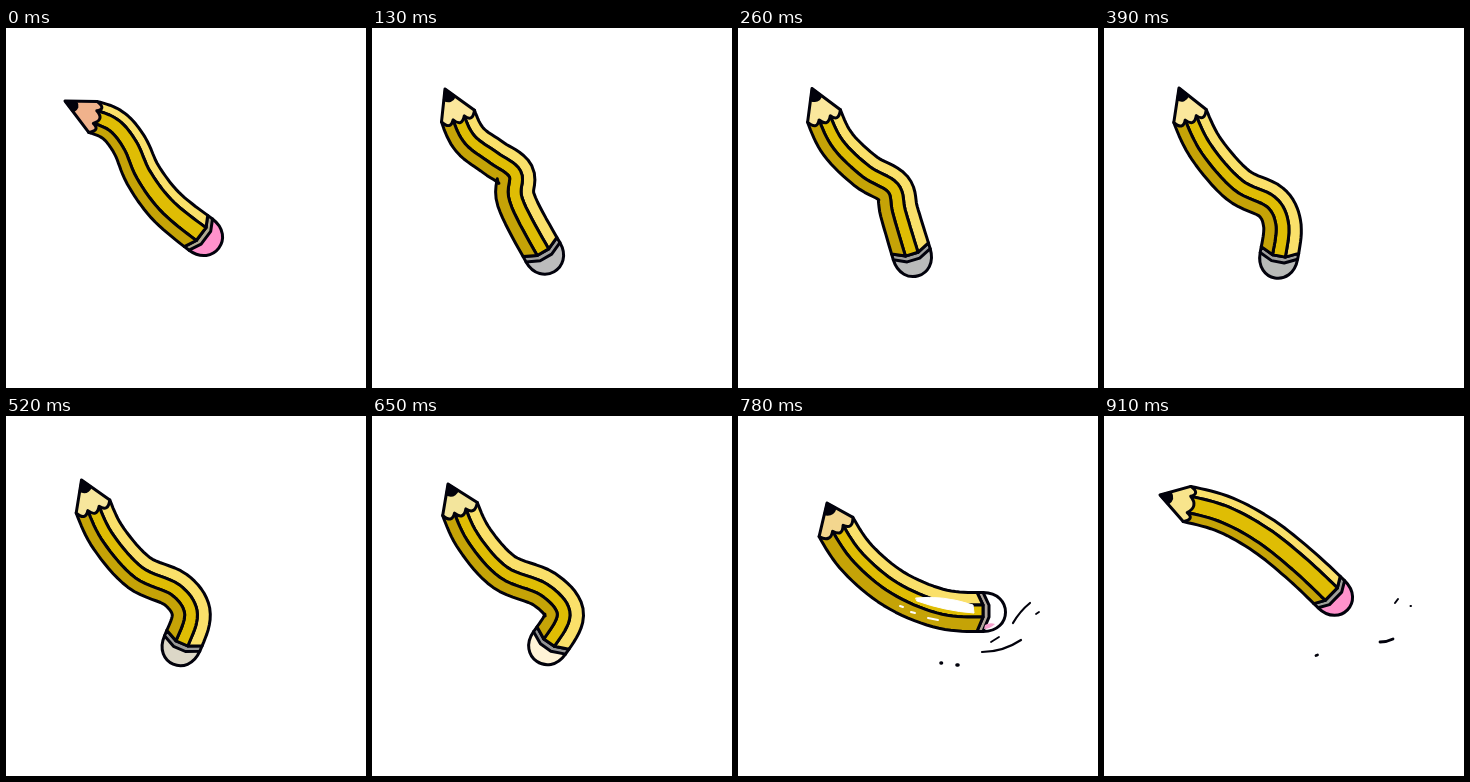
Write an HTML page that moves like this. It is 360 by 360 pixels and loops after 1.04 s.

```html
<!DOCTYPE html>
<html lang="en">
<head>
<meta charset="utf-8">
<title>Wobbly pencil</title>
<style>
html, body { margin: 0; width: 100%; height: 100%; overflow: hidden; background: #fff; }
svg { display: block; width: 100vw; height: 100vh; }
path { stroke-linecap: round; stroke-linejoin: round; }
</style>
</head>
<body>
<svg id="stage" viewBox="0 0 360 360" xmlns="http://www.w3.org/2000/svg"></svg>
<script>
const STEP = 130, SAMPLES = 8;
const INK = '#02020c', BODY = ['#fae06a', '#dfbd04', '#c5a307'];
const stage = document.getElementById('stage');

// spine runs from wood to ferrule, width from its start to its end,
// ridges are the two lines along the body as parts of the width
const bend = {
  tip: [59, 73], width: [32, 39], ridges: [0.28, 0.69],
  spine: [[87, 89], [108, 98], [124, 118], [137, 147], [159, 177], [190, 203]],
  wood: '#f0b28c', metal: '#b0aa90', rubber: '#ff92cc'
};
const wave = {
  tip: [73, 61], width: [35, 39], ridges: [0.33, 0.67],
  spine: [[86, 88], [98, 112], [122, 130], [143, 146], [144, 172], [168, 219]],
  wood: '#fbe79c', metal: '#a0a09e', rubber: '#bcbcbc'
};
const sag = {
  tip: [75, 60], width: [35, 38], ridges: [0.33, 0.67],
  spine: [[86, 88], [103, 122], [134, 157], [167, 174], [178, 195], [176, 222]],
  wood: '#fbe79c', metal: '#a0a09e', rubber: '#b8bab8'
};
const curl = {
  tip: [76, 68], width: [37, 39], ridges: [0.35, 0.68],
  spine: [[88, 93], [103, 124], [132, 156], [172, 173], [192, 196], [181, 222]],
  wood: '#f3e59c', metal: '#949494', rubber: '#fff3d6'
};
const flick = {
  tip: [89, 87], width: [39, 39], ridges: [0.32, 0.63],
  spine: [[98, 111], [120, 143], [156, 173], [200, 192], [239, 196]],
  wood: '#f3d68e', metal: '#b0a69c', rubber: '#ffffff'
};
const rest = {
  tip: [56, 79], width: [36, 38], ridges: [0.27, 0.73],
  spine: [[83, 88], [122, 99], [160, 120], [194, 147], [223, 174]],
  wood: '#f8e48c', metal: '#a0a09a', rubber: '#ff92cc'
};

function mix(a, b, k) {
  if (Array.isArray(a)) return a.map((v, i) => mix(v, b[i], k));
  if (typeof a === 'number') return a + (b - a) * k;
  const rgb = s => [1, 3, 5].map(i => parseInt(s.slice(i, i + 2), 16));
  return `rgb(${mix(rgb(a), rgb(b), k).map(Math.round)})`;
}
const between = (p, q) =>
  Object.fromEntries(Object.keys(p).map(k => [k, mix(p[k], q[k], 0.5)]));

const add = (p, q, k = 1) => [p[0] + q[0] * k, p[1] + q[1] * k];
const unit = v => { const n = Math.hypot(...v); return [v[0] / n, v[1] / n]; };
const xy = p => p.map(v => v.toFixed(1)).join(' ');
const line = pts => pts.map(xy).join('L');
const shape = (d, fill, width = 3, stroke = INK) =>
  `<path d="${d}" fill="${fill}" stroke="${stroke}" stroke-width="${width}"/>`;
const strokes = (d, width, color) => shape(d, 'none', width, color);

// virtual neighbour past an end that carries on part of the bend
const beyond = (a, b, c) => a.map((v, i) => 2.5 * v - 2 * b[i] + c[i] / 2);

// points with unit directions along a Catmull-Rom spline
function trace(pts) {
  const n = pts.length;
  const p = [beyond(...pts), ...pts, beyond(pts[n - 1], pts[n - 2], pts[n - 3])];
  const out = [];
  for (let s = 0; s <= (n - 1) * SAMPLES; s++) {
    const i = Math.min(Math.floor(s / SAMPLES), n - 2), u = s / SAMPLES - i;
    const axis = [0, 1].map(k => {
      const [a, b, c, d] = p.slice(i, i + 4).map(v => v[k]);
      const c1 = (c - a) / 2, c2 = a - 2.5 * b + 2 * c - d / 2, c3 = (3 * b - 3 * c + d - a) / 2;
      return [b + u * (c1 + u * (c2 + u * c3)), c1 + u * (2 * c2 + 3 * u * c3)];
    });
    out.push({ at: axis.map(v => v[0]), dir: unit(axis.map(v => v[1])) });
  }
  return out;
}

function pencil(p) {
  const path = trace(p.spine), last = path.length - 1;
  const cuts = [0, ...p.ridges, 1], inside = i => i === 1 || i === 2;
  const edges = cuts.map(cut => path.map(({ at, dir }, i) =>
    add(at, [dir[1], -dir[0]], mix(...p.width, i / last) * (0.5 - cut))));

  // ferrule bends outwards at both ridges
  const end = path[last].dir;
  edges.forEach((e, i) => inside(i) && e.push(add(e[last], end, 6)));
  const rim = edges.map(e => e[e.length - 1]);
  const outer = rim.map(v => add(v, end, 6));
  const cap = [outer[0], outer[3]].map(v => add(v, end, 30));

  let out = shape(`M${xy(outer[0])}C${xy(cap[0])} ${xy(cap[1])} ${xy(outer[3])}Z`, p.rubber);
  out += shape(`M${line([...rim, ...outer.reverse()])}Z`, p.metal);
  BODY.forEach((fill, i) => {
    out += shape(`M${line([...edges[i], ...edges[i + 1].slice().reverse()])}Z`, fill);
  });

  // sharpened end with a scalloped border
  const start = path[0].dir;
  const cusps = edges.map((e, i) => add(e[0], start, inside(i) ? 2 : 0));
  let cone = `M${xy(p.tip)}L${xy(cusps[0])}`;
  for (let i = 0; i < 3; i++) {
    cone += `Q${xy(add(mix(cusps[i], cusps[i + 1], 0.5), start, 10))} ${xy(cusps[i + 1])}`;
  }
  const [l, r] = [cusps[0], cusps[3]].map(v => mix(p.tip, v, 0.34));
  const round = add(mix(l, r, 0.5), start, 6);
  return out + shape(cone + 'Z', p.wood) +
    shape(`M${xy(p.tip)}L${xy(l)}Q${xy(round)} ${xy(r)}Z`, INK, 2);
}

const swish =
  shape('M247 209Q252 206 257 208Q252 213 246 213Z', '#f4a0cc', 0) +
  shape('M178 182Q205 179 235 189L236 197Q207 195 179 185Z', '#fff', 1, '#fff') +
  strokes('M162 190l3 1M173 196l4 1M190 202l10 2', 2, '#fff') +
  strokes('M275 207Q282 195 292 187M244 236Q265 236 283 224', 2.2) +
  strokes('M253 226L261 221M298 198L301 196', 1.8) +
  strokes('M203 247h.5M219 249h1', 3.6);
const specks =
  strokes('M276 226Q283 226 289 223M212 239.5l1.5 -.5', 2.8) +
  strokes('M291 187L294 183M306.5 190h.5', 2);

const scenes = [
  ...[bend, wave, between(wave, sag), sag, between(sag, curl), curl].map(pencil),
  pencil(flick) + swish,
  pencil(rest) + specks
];
let shown = -1;
function draw(ms) {
  const i = Math.floor(ms / STEP) % scenes.length;
  if (i !== shown) stage.innerHTML = scenes[shown = i];
}
const begin = performance.now();
function tick() {
  draw(performance.now() - begin);
  requestAnimationFrame(tick);
}
tick();
</script>
</body>
</html>
```
